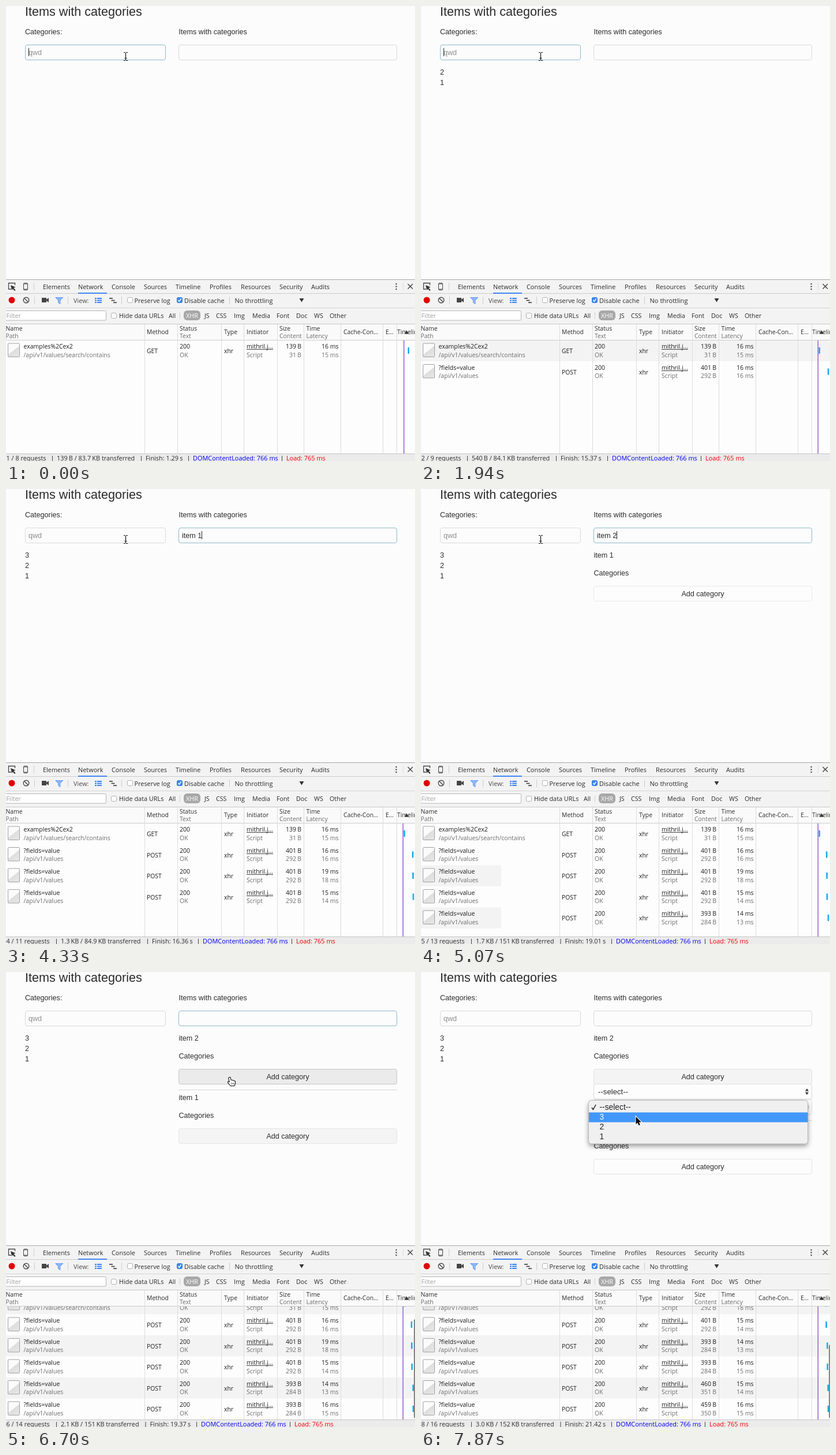
An HTML page with a canvas for the animation above (8 s loop, 709 px wide and 789 px high).

```html
<!DOCTYPE html>
<html lang="en">
<head>
<meta charset="utf-8">
<title>Items with categories</title>
<style>
html, body { margin: 0; width: 100%; height: 100%; overflow: hidden; background: #fcfcfc; }
canvas { display: block; }
</style>
</head>
<body>
<canvas id="stage" width="709" height="789"></canvas>
<script>
const c = document.getElementById('stage').getContext('2d');
const W = 709, LOOP = 8000, ROW = 36.5, TOP = 579.5, BOTTOM = 776;
const PAGE = '"Liberation Sans", Arial, sans-serif';
const UI = '"Open Sans", "Noto Sans", sans-serif';
const INK = '#2b2b2b', GREY = '#6c6c6c', BG = '#fcfcfc', EDGE = '#d9d9d9', FOCUS = '#8fbacb';

// Each step changes part of the state at the given time.
const steps = [
  [0, { focus: 1, caret: true, value: '', cats: 0, items: 0, reqs: 1, selects: 0, x: 207, y: 87, pointer: 'beam', hover: false, popup: -1 }],
  [450, { caret: false }],
  [740, { value: '1', caret: true }],
  [1340, { value: '', cats: 1 }],
  [1490, { reqs: 2 }],
  [1790, { value: '2' }],
  [1940, { value: '', cats: 2 }],
  [2080, { reqs: 3 }],
  [2230, { value: '3' }],
  [2530, { value: '', cats: 3 }],
  [2680, { reqs: 4, focus: 2 }],
  [3280, { caret: false }],
  [3580, { value: 'i', caret: true }],
  [3730, { value: 'it' }],
  [3880, { value: 'ite' }],
  [4030, { value: 'item' }],
  [4170, { value: 'item ' }],
  [4320, { value: 'item 1' }],
  [4470, { value: '', items: 1 }],
  [4620, { reqs: 5 }],
  [4770, { value: 'it' }],
  [4920, { value: 'item ' }],
  [5070, { value: 'item 2' }],
  [5220, { value: '', items: 2 }],
  [5370, { reqs: 6 }],
  [5820, { caret: false }],
  [6110, { x: 222, y: 96, pointer: 'arrow' }],
  [6260, { x: 275, y: 126 }],
  [6400, { x: 340, y: 163 }],
  [6550, { x: 382, y: 184, pointer: 'hand', hover: true }],
  [6700, { x: 390, y: 190 }],
  [6850, { focus: 0 }],
  [6990, { selects: 1 }],
  [7140, { reqs: 7 }],
  [7290, { selects: 2 }],
  [7440, { reqs: 8 }],
  [7580, { x: 378, y: 232, pointer: 'arrow', hover: false }],
  [7730, { x: 373, y: 238, popup: 0 }],
  [7870, { x: 372, y: 251, popup: 1 }]
];

// size, content, time, latency, finish, transferred, count, total
const requests = [
  [139, 31, 16, 15, 1.29, '139\u2009B', '1 / 8', '83.7'],
  [401, 292, 16, 16, 15.37, '540\u2009B', '2 / 9', '84.1'],
  [401, 292, 19, 18, 15.87, '941\u2009B', '3 / 10', '84.5'],
  [401, 292, 15, 14, 16.36, '1.3\u2009KB', '4 / 11', '84.9'],
  [393, 284, 14, 13, 19.01, '1.7\u2009KB', '5 / 13', '151'],
  [393, 284, 16, 15, 19.37, '2.1\u2009KB', '6 / 14', '151'],
  [460, 351, 15, 14, 20.96, '2.5\u2009KB', '7 / 15', '152'],
  [459, 350, 16, 15, 21.42, '3.0\u2009KB', '8 / 16', '152']
];

function text(s, x, y, size, color = INK, align = 'left', face = UI) {
  c.font = size + 'px ' + face;
  c.fillStyle = color;
  c.textAlign = align;
  c.fillText(s, x, y);
}
const page = (s, x, y, color, align, size = 12.6) => text(s, x, y, size, color, align, PAGE);

function rect(x, y, w, h, color) {
  c.fillStyle = color;
  c.fillRect(x, y, w, h);
}

function box(x, y, w, h, r, fill, stroke) {
  c.beginPath();
  c.roundRect(x, y, w, h, r);
  if (fill) { c.fillStyle = fill; c.fill(); }
  if (stroke) { c.strokeStyle = stroke; c.lineWidth = 1; c.stroke(); }
}

function line(pts, color, width = 1) {
  c.beginPath();
  for (let i = 0; i < pts.length; i += 2) c.lineTo(pts[i], pts[i + 1]);
  c.strokeStyle = color;
  c.lineWidth = width;
  c.stroke();
}

function shape(pts, fill, stroke, width = 1) {
  c.beginPath();
  for (let i = 0; i < pts.length; i += 2) c.lineTo(pts[i], pts[i + 1]);
  c.closePath();
  if (stroke) { c.strokeStyle = stroke; c.lineWidth = width; c.stroke(); }
  c.fillStyle = fill;
  c.fill();
}

function disc(x, y, r, fill, stroke, width = 1) {
  c.beginPath();
  c.arc(x, y, r, 0, 7);
  if (fill) { c.fillStyle = fill; c.fill(); }
  if (stroke) { c.strokeStyle = stroke; c.lineWidth = width; c.stroke(); }
}

function field(x, w, s, id, hint) {
  const on = s.focus === id;
  const fill = on && id === 2 && s.value === '' && !s.items ? '#f5fbfe' : BG;
  box(x + .5, 67.5, w - 1, 26, 3.5, fill, on ? FOCUS : EDGE);
  const value = on ? s.value : '';
  page(value || hint, x + 6, 84.5, value ? INK : '#8f8f8f');
  if (on && s.caret) {
    c.font = '12.6px ' + PAGE;
    rect(x + 6 + Math.round(c.measureText(value).width), 73, 1, 14, '#222222');
  }
}

function select(y) {
  box(299.5, y, 378, 26, 3.5, '#fdfdfd', EDGE);
  page('--select--', 307, y + 17, INK, 'left', 13.2);
  shape([666, y + 12, 672, y + 12, 669, y + 7.5], '#333333');
  shape([666, y + 14, 672, y + 14, 669, y + 18.5], '#333333');
}

function drawItem(name, y, fill, edge, selects) {
  page(name, 299.5, y);
  page('Categories', 299.5, y + 31);
  for (let i = 0; i < selects; i++) select(y + 75.5 + i * 26.5);
  box(299.5, y + 49.5, 378, 26, 3.5, fill, edge);
  page('Add category', 488.5, y + 67, INK, 'center');
}

function drawPage(s) {
  page('Items with categories', 33, 17, INK, 'left', 21.6);
  page('Categories:', 33, 49);
  page('Items with categories', 299.5, 49);
  field(33, 244, s, 1, 'qwd');
  field(299, 379, s, 2, '');
  for (let i = 0; i < s.cats; i++) page(String(s.cats - i), 33, 119 + i * 18);
  if (s.items === 1) drawItem('item 1', 119, BG, '#e8e8e8', 0);
  if (s.items === 2) {
    const gap = s.selects * 26.5;
    const second = s.selects ? BG : '#f4f4f4';
    drawItem('item 2', 119, s.hover ? '#ebebeb' : '#f4f4f4', s.hover ? '#c6c6c6' : '#e2e2e2', s.selects);
    rect(299, Math.round(203.5 + gap), 379, 1, '#d8d8d8');
    drawItem('item 1', Math.round(222 + gap), second, '#e6e6e6', 0);
  }
}

function drawPopup(active) {
  c.save();
  c.shadowColor = 'rgba(0,0,0,.4)';
  c.shadowBlur = 9;
  c.shadowOffsetY = 4;
  box(290.5, 222.5, 380, 75.5, 5, '#f0f0f0');
  c.restore();
  box(290.5, 222.5, 380, 75.5, 5, null, '#b9b9b9');
  rect(291, 226.5 + active * 17, 379.5, 17, '#4198fa');
  ['--select--', '3', '2', '1'].forEach((s, i) =>
    page(s, 309.5, 239 + i * 17, i === active ? '#ffffff' : '#222222', 'left', 13.8));
  line([296, 235, 298.5, 238.5, 303, 230], active ? '#222222' : '#ffffff', 1.5);
}

function drawPointer({ pointer, x, y }) {
  c.save();
  c.translate(x + .5, y);
  if (pointer === 'beam') {
    line([0, -6, 0, 7], '#111111', 1.2);
    line([-3.5, -6.5, -1, -6.5, 0, -5.5, 1, -6.5, 3.5, -6.5], '#111111');
    line([-3.5, 7.5, -1, 7.5, 0, 6.5, 1, 7.5, 3.5, 7.5], '#111111');
    line([-2, 3.5, 2, 3.5], '#111111');
  } else if (pointer === 'arrow') {
    shape([0, 0, 0, 13, 3, 10.3, 5.2, 15, 7.4, 14, 5.3, 9.5, 9.3, 9.2], '#000000', '#ffffff', 2);
  } else {
    shape([-3.5, -7, -2, -7, -1, -2.5, 2, -2, 4.5, -1, 6.5, 0, 6.5, 3, 5, 7, -1, 7, -5.5, 1.5, -5, .2, -2.6, 1.4, -4.2, -6], '#ffffff', '#111111', 2.2);
    line([0, 2, .4, 5], '#333333', .8);
    line([2.4, 2, 2.5, 5], '#333333', .8);
    line([4.5, 2, 4.2, 5], '#333333', .8);
  }
  c.restore();
}

function checkbox(x, y, on) {
  box(x + .5, y + .5, 9, 9, 2, on ? '#3b87f7' : '#ffffff', on ? '#2f78e4' : '#b0b0b0');
  if (on) line([x + 2.5, y + 5, x + 4.3, y + 7.3, x + 7.6, y + 2.5], '#ffffff', 1.4);
}

function drawTabs() {
  rect(0, 474, W, 78, '#f3f3f3');
  rect(0, 474, W, 1, '#a6a6a6');
  rect(0, 498, W, 1, '#cccccc');
  rect(0, 523, W, 1, '#d4d4d4');
  // inspect and device icons
  line([9, 491, 4.5, 491, 4.5, 480.5, 15.5, 480.5, 15.5, 484], '#444444', 1.3);
  shape([8, 484, 16.5, 487.5, 13.3, 489, 16.5, 492.5, 15, 494, 11.6, 490.6, 10.2, 493], '#333333');
  box(30.5, 480.5, 7, 12, 1.5, '#f3f3f3', '#444444');
  line([30, 482, 38, 482], '#444444');
  line([30, 491, 38, 491], '#444444');
  rect(48, 480, 1, 13, '#cccccc');
  const tabs = { Elements: 64, Network: 125, Console: 183, Sources: 239, Timeline: 294, Profiles: 353, Resources: 407, Security: 474, Audits: 529 };
  for (const name in tabs) text(name, tabs[name], 490.5, 10.9);
  rect(125, 497, 50, 2, '#4285f4');
  for (const y of [482, 486.5, 491]) disc(676.5, y, 1.2, '#444444');
  rect(688, 480, 1, 13, '#dddddd');
  line([696.5, 482, 705, 490.5], '#444444', 1.4);
  line([705, 482, 696.5, 490.5], '#444444', 1.4);
}

function drawTools() {
  disc(10, 510, 5.5, '#e00000');
  disc(35, 510, 4.8, null, '#444444', 1.4);
  line([31.7, 506.7, 38.3, 513.3], '#444444', 1.4);
  rect(49, 504, 1, 13, '#cccccc');
  rect(62, 506, 8, 8, '#444444');
  shape([70, 509, 74, 506, 74, 514, 70, 511], '#444444');
  shape([86.5, 505.5, 98, 505.5, 93.7, 510, 93.7, 516, 90.8, 514, 90.8, 510], '#8fb8f7', '#3b82f6', 1.2);
  rect(107, 504, 1, 13, '#cccccc');
  text('View:', 117, 514.5, 10.9, '#4a4a4a');
  for (let i = 0; i < 3; i++) {
    rect(154, 506 + i * 3.5, 3, 2, '#3b82f6');
    rect(158, 506 + i * 3.5, 8, 2, '#3b82f6');
    rect(179 + i * 3.5, 506 + i * 3.7, 6, 1.7, '#444444');
  }
  rect(200, 504, 1, 13, '#cccccc');
  checkbox(210, 505, false);
  text('Preserve log', 222.5, 514.5, 10.9);
  checkbox(296, 505, true);
  text('Disable cache', 309, 514.5, 10.9);
  rect(387, 504, 1, 13, '#cccccc');
  text('No throttling', 396.5, 514.5, 11.1);
  shape([508.5, 507, 516.5, 507, 512.5, 513.5], '#333333');

  box(-3.5, 528.5, 177, 16.5, 2, '#ffffff', '#b5b5b5');
  text('Filter', .5, 541, 10.9, '#a0a0a0');
  checkbox(182, 532, false);
  text('Hide data URLs', 196, 541, 10.9);
  rect(301, 531, 1, 12, '#d0d0d0');
  box(308, 528, 29, 17, 6, '#a8a8a8');
  text('XHR', 322.5, 541, 10.9, '#ffffff', 'center');
  const kinds = { All: 282, JS: 344, CSS: 364, Img: 395, Media: 427, Font: 469, Doc: 503, WS: 534, Other: 561 };
  for (const name in kinds) text(name, kinds[name], 541, 10.7);
}

function pair(a, b, x, y, align) {
  text(a, x, y, 10.5, '#1c1c1c', align);
  text(b, x, y + 14.5, 10.5, GREY, align);
}

function drawHead() {
  rect(0, 551, W, 29, '#fafafa');
  rect(0, 551, W, 1, '#c8c8c8');
  rect(0, 579, W, 1, '#cccccc');
  const double = [['Name', 'Path', -.5], ['Status', 'Text', 301], ['Size', 'Content', 474], ['Time', 'Latency', 520.5]];
  for (const [a, b, x] of double) {
    text(a, x, 563, 10.4);
    text(b, x, 575.5, 10.4, GREY);
  }
  const single = { Method: 244, Type: 378, Initiator: 417, 'Cache-Con…': 585, 'E…': 658, Timeline: 678 };
  for (const name in single) text(name, single[name], 569, 10.4);
  shape([691, 568.5, 698, 568.5, 694.5, 562.5], '#333333');
}

function drawIcon(y) {
  const g = c.createLinearGradient(3, y, 23, y + 25);
  g.addColorStop(.5, '#fbfbfb');
  g.addColorStop(.52, '#dedede');
  g.addColorStop(1, '#e8e8e8');
  box(3.5, y + .5, 20, 23.5, 1, g, '#a0a0a0');
}

// Stripes keep their place on screen once the list scrolls.
function stripeWidth(i, n) {
  if (n === 1 || n === 4) return 0;
  if (n === 5) return i % 2 || !i ? 0 : 139;
  return (n > 5 ? i + n : i) % 2 ? 0 : W;
}

function drawRow(r, i, y, n) {
  rect(0, y, stripeWidth(i, n), ROW, '#f3f3f3');
  drawIcon(y + 5);
  const first = i === 0;
  pair(first ? 'examples%2Cex2' : '?fields=value', first ? '/api/v1/values/search/contains' : '/api/v1/values', 30.5, y + 14.5);
  text(first ? 'GET' : 'POST', 244, y + 22.5, 10.4, '#1c1c1c');
  pair('200', 'OK', 301, y + 14.5);
  text('xhr', 378, y + 22.5, 10.4, '#1c1c1c');
  pair('mithril.j…', 'Script', 417, y + 14.5);
  rect(417, Math.round(y + 15.5), 46, 1, '#444444');
  pair(r[0] + '\u2009B', r[1] + '\u2009B', 512, y + 14.5, 'right');
  pair(r[2] + ' ms', r[3] + ' ms', 576.5, y + 14.5, 'right');
}

function drawTable(n) {
  const scroll = Math.max(0, n * ROW - (BOTTOM - TOP));
  const end = requests[n - 1][4];
  const rowY = i => TOP + i * ROW - scroll;
  const lineX = n === 1 ? 689 : 687.5;
  rect(0, 580, W, BOTTOM - 580, '#fdfdfd');
  c.save();
  c.beginPath();
  c.rect(0, 580, W, BOTTOM - 580);
  c.clip();
  for (let i = 0; i < n; i++) drawRow(requests[i], i, rowY(i), n);
  rect(lineX, 580, 1.5, BOTTOM - 580, '#9a5fd0');
  for (let i = 0; i < n; i++) {
    const x = n === 1 ? 696.5 : i === 0 ? 689.5 : 690 + 14.8 * requests[i][4] / end;
    rect(x, rowY(i) + 12.5, 2.5, 11, '#12a8ee');
  }
  if (scroll) {
    const y = 580 + scroll * .69 + (n < 8 ? 6 : 0);
    box(707, y, 8, BOTTOM - 2 - y, 3, '#858585');
  }
  c.restore();
  for (const x of [240, 297, 373, 412, 470, 516, 580, 653, 677]) rect(x, 552, 1, BOTTOM - 552, '#dcdcdc');
}

function drawStatus(n) {
  const r = requests[n - 1];
  const finishX = n < 3 ? 242 : n < 5 ? 253 : 249.5;
  const domX = n === 1 ? 324 : n === 2 ? 331 : n < 5 ? 341 : 338;
  const moved = n < 3 ? 88 : 95;
  rect(0, BOTTOM, W, 13, '#ebebeb');
  rect(0, BOTTOM, W, 1, '#c4c4c4');
  text(r[6] + ' requests', .5, 788, 10.9);
  text(r[5] + ' / ' + r[7] + '\u2009KB transferred', moved, 788, 10.9);
  text('Finish: ' + r[4].toFixed(2) + '\u2009s', finishX, 788, 10.9);
  text('DOMContentLoaded: 766 ms', domX, 788, 10.95, '#0000f0');
  text('Load: 765 ms', domX + 162, 788, 10.95, '#f00000');
  for (const x of [moved, finishX, domX, domX + 162]) rect(x - 8, 780, 1, 9, '#444444');
}

function draw(s) {
  rect(0, 0, W, 789, BG);
  drawPage(s);
  if (s.popup >= 0) drawPopup(s.popup);
  drawPointer(s);
  drawTabs();
  drawTools();
  drawHead();
  drawTable(s.reqs);
  drawStatus(s.reqs);
}

function tick() {
  const t = performance.now() % LOOP;
  const state = {};
  for (const [at, change] of steps) if (at <= t) Object.assign(state, change);
  draw(state);
  requestAnimationFrame(tick);
}
tick();
</script>
</body>
</html>
```
